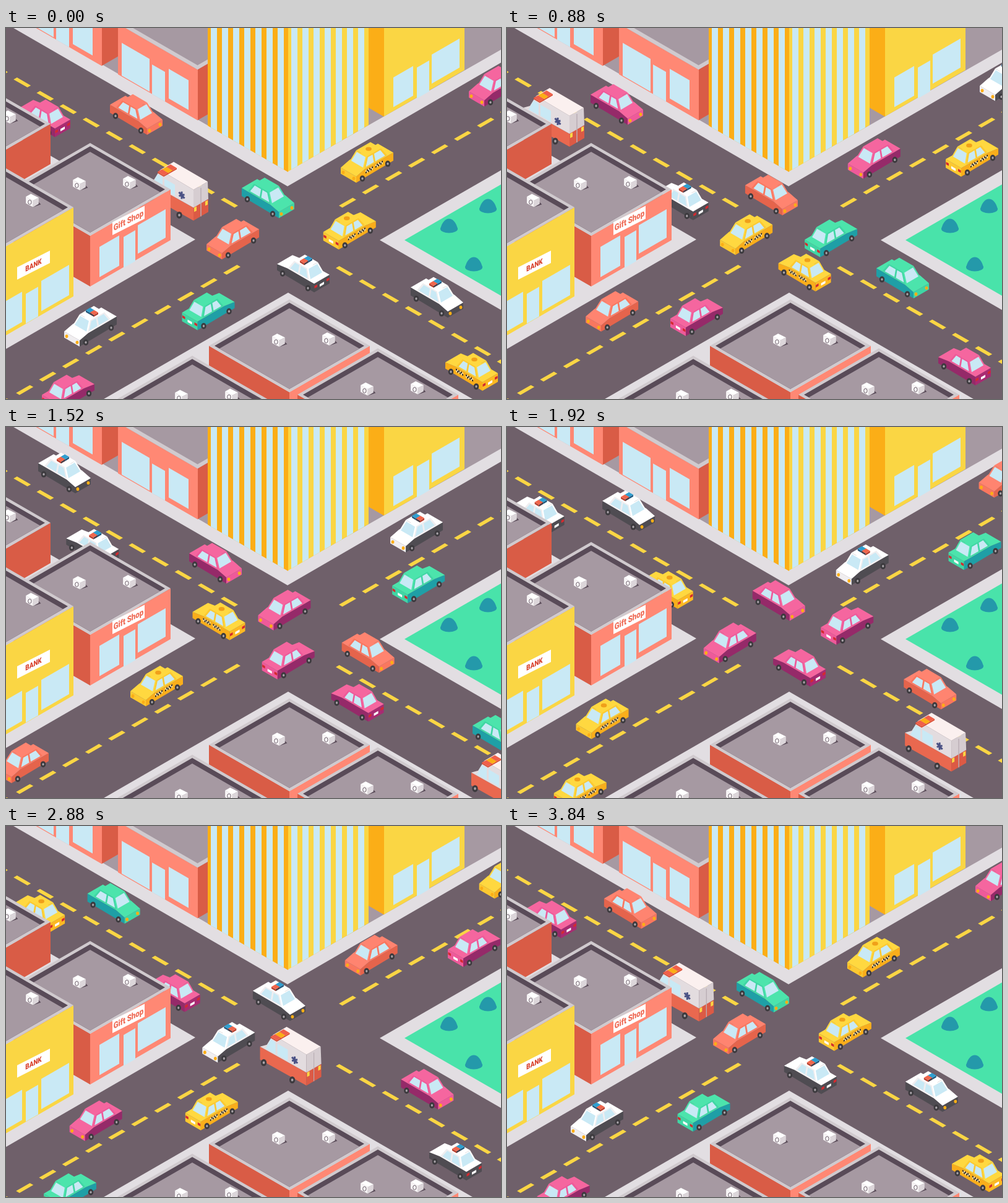
Animation, 800 px wide and 600 px high, one loop 3.88 s. Source, as an HTML page with a canvas:

```html
<!DOCTYPE html>
<html lang="en">
<head>
<meta charset="utf-8">
<title>City traffic</title>
<style>
  html, body { margin: 0; width: 100%; height: 100%; overflow: hidden; background: #6f606a; }
  canvas { display: block; }
</style>
</head>
<body>
<canvas id="stage" width="800" height="600"></canvas>
<script>
const ctx = document.getElementById('stage').getContext('2d');
const S = 0.577, STEP = 40, STEPS = 97;
const C = {
  road: '#6f606a', walk: '#e2dee2', roof: '#a699a2', rim: '#d0cace', shade: '#594b58',
  red: '#ff8874', brick: '#d95c46', yellow: '#fad644', orange: '#fbae17',
  glass: '#c9e9f5', green: '#49e3aa', bush: '#2499aa', white: '#ffffff', dark: '#3c3a3e'
};

function poly(color, ...pts) {
  ctx.fillStyle = color;
  ctx.beginPath();
  pts.forEach(p => ctx.lineTo(p[0], p[1]));
  ctx.fill();
}
function oval(color, x, y, rx, ry = rx) {
  ctx.fillStyle = color;
  ctx.beginPath();
  ctx.ellipse(x, y, rx, ry, 0, 0, 7);
  ctx.fill();
}
// Upright parallelogram: (x, y) is its top left, s the slope of its top edge
function wall(color, x, y, w, h, s) {
  poly(color, [x, y], [x + w, y + s * w], [x + w, y + s * w + h], [x, y + h]);
}
function diamond(color, x, y, w) {
  poly(color, [x - w, y], [x, y - w * S], [x + w, y], [x, y + w * S]);
}

// ---------- city ----------
// (x, y) is the middle of the first dash, (dx, dy) the way to the next
function dashes(x, y, dx, dy, count) {
  const s = Math.sign(dx * dy);
  for (let i = 0; i < count; i++, x += dx, y += dy) {
    poly(C.yellow, [x - 14, y - 4.8 * s], [x - 8.4, y - 8 * s],
      [x + 14, y + 4.8 * s], [x + 8.4, y + 8 * s]);
  }
}

function ground() {
  ctx.fillStyle = C.road;
  ctx.fillRect(0, 0, 800, 600);
  dashes(361, 282.5, -37.2, -21.6, 11);
  dashes(552, 282.5, 37.2, -21.6, 8);
  dashes(547, 393, 37.2, 21.6, 8);
  dashes(365, 391, -37.2, 21.6, 11);
}

function sidewalks() {
  poly(C.walk, [12, 0], [455, 256], [800, 56], [800, 0]);
  poly(C.roof, [53, 0], [455, 232], [800, 35], [800, 0]);
  poly(C.walk, [0, 165], [306, 342], [0, 519]);
  poly(C.walk, [800, 230], [604, 343], [800, 456]);
  poly(C.green, [800, 253], [644, 343], [800, 433]);
  poly(C.walk, [158, 600], [456, 428], [754, 600]);
  for (const [x, y] of [[716, 320], [779, 288], [756, 382]]) {
    oval(C.bush, x, y + 5, 14, 6.5);
    ctx.beginPath();
    ctx.moveTo(x - 14, y + 5);
    ctx.bezierCurveTo(x - 9, y - 17, x + 9, y - 17, x + 14, y + 5);
    ctx.fill();
  }
}

// (x, y) is the top of the near corner
function redShop(x, y) {
  wall(C.red, x - 129, y - 74, 129, 82, S);
  wall(C.rim, x - 129, y - 81, 129, 7, S);
  wall(C.brick, x, y, 26, 82, -S);
  wall(C.rim, x, y - 7, 26, 7, -S);
  wall(C.glass, x - 123, y - 43, 45, 53, S);
  wall(C.glass, x - 74, y - 8, 21, 48, S);
  wall(C.glass, x - 47, y - 1, 32, 48, S);
}

function northBlock() {
  redShop(155, -21);
  redShop(310, 67);

  wall(C.orange, 326, -100, 130, 258, S);
  wall(C.yellow, 456, -26, 130, 258, -S);
  for (let i = 0; i < 7; i++) {
    wall(C.glass, 331 + 18 * i, -100, 10, 261 + 18 * S * i, S);
    wall(C.glass, 461 + 18 * i, -20, 10, 249 - 18 * S * i, -S);
  }

  wall(C.orange, 586, -20, 25, 149, S);
  wall(C.yellow, 611, -10, 130, 153, -S);
  wall(C.glass, 626, 80, 32, 48, -S);
  wall(C.glass, 664, 64, 20, 50, -S);
  wall(C.glass, 688, 43, 45, 47, -S);
}

function airUnit(x, y) {
  ctx.save();
  ctx.translate(x, y);
  ctx.scale(0.9, 0.9);
  poly(C.shade, [-6, 7], [2, 12], [16, 7], [12, 3]);
  poly('#f8f5f6', [-11, -7], [2, 0], [2, 12], [-11, 5]);
  poly(C.white, [-11, -7], [-2, -12], [12, -5], [2, 0]);
  poly('#dcd6da', [2, 0], [12, -5], [12, 6], [2, 12]);
  ctx.strokeStyle = C.shade;
  ctx.lineWidth = 1;
  ctx.beginPath();
  ctx.ellipse(-4, 3, 3, 4, 0, 0, 7);
  ctx.stroke();
  ctx.restore();
}

function roof(x, y) {
  const w = 121, h = w * S, drop = 9, floor = w * (1 - drop / (2 * h));
  diamond(C.rim, x, y, 130);
  diamond(C.shade, x, y, w);
  poly(C.roof, [x, y - h + drop], [x + floor, y + drop / 2], [x, y + h], [x - floor, y + drop / 2]);
  airUnit(x - 18, y - 9);
  airUnit(x + 63, y - 11);
}

function sign(text, size, color, x, y, w, h) {
  wall(C.white, x, y, w, h, -0.51);
  ctx.save();
  ctx.transform(0.82, -0.42, 0, 1, x + w / 2, y - 0.255 * w + h / 2);
  ctx.fillStyle = color;
  ctx.font = `900 ${size}px Roboto, sans-serif`;
  ctx.textAlign = 'center';
  ctx.textBaseline = 'middle';
  ctx.fillText(text, 0, 0.5);
  ctx.restore();
}

function nearBlocks() {
  wall(C.brick, -58, 230, 130, 65, -S);
  roof(-58, 155);

  wall(C.brick, 6, 261, 130, 82, S);
  wall(C.red, 136, 336, 130, 82, -S);
  wall(C.glass, 151, 354, 32, 49, -S);
  wall(C.glass, 190, 338, 19, 50, -S);
  wall(C.glass, 213, 319, 45, 46, -S);
  roof(136, 261);
  sign('Gift Shop', 14, '#ee6a55', 172, 314, 52, 21);

  wall(C.yellow, -21, 365, 130, 144, -S);
  wall(C.glass, -20, 453, 46, 49, -S);
  wall(C.glass, 32, 430, 20, 48, -S);
  wall(C.glass, 57, 409, 45, 49, -S);
  roof(-21, 290);
  sign('BANK', 12, '#d9442f', 18, 387, 53, 20);

  wall(C.brick, 328, 514, 130, 82, S);
  wall(C.red, 458, 589, 130, 82, -S);
  roof(458, 514);
  wall(C.red, 301, 680, 130, 82, -S);
  roof(301, 605);
  wall(C.brick, 471, 593, 130, 82, S);
  wall(C.red, 601, 668, 130, 82, -S);
  roof(601, 593);
}

// ---------- vehicles ----------
// a runs along the car, b across it, h upwards
const iso = (a, b, h) => [a + b, 31.2 + 0.58 * (a - b) - h];
const face = (color, ...pts) => poly(color, ...pts.map(p => iso(...p)));
const sideQuad = (color, a0, a1, h0, h1) =>
  face(color, [a0, 0, h0], [a0, 0, h1], [a1, 0, h1], [a1, 0, h0]);
const endQuad = (color, b0, b1, h0, h1) =>
  face(color, [60, b0, h0], [60, b0, h1], [60, b1, h1], [60, b1, h0]);

function block(top, left, right, a0, a1, b0, b1, h0, h1) {
  face(left, [a0, b0, h0], [a0, b0, h1], [a1, b0, h1], [a1, b0, h0]);
  face(right, [a1, b0, h0], [a1, b0, h1], [a1, b1, h1], [a1, b1, h0]);
  face(top, [a0, b0, h1], [a0, b1, h1], [a1, b1, h1], [a1, b0, h1]);
}

// Paint: top, cabin, side, nose, tail
const PAINT = {
  red: ['#ff8470', '#f9775f', '#e5644c', '#f9775f', '#e5644c'],
  pink: ['#f5669f', '#ee5a9a', '#952a69', '#ee5a9a', '#a82b72'],
  green: ['#4ce4ac', '#40d6a4', '#1f9fa6', '#40d6a4', '#40d6a4'],
  police: [C.white, '#f0eef0', '#4f4c52', '#f0eef0', '#4f4c52'],
  taxi: ['#ffd840', '#fcc931', '#f9ae1b', '#fcc931', '#fcb923']
};

function car(kind, rear, mirrored) {
  const [top, cabin, side, nose, tail] = PAINT[kind];
  const [base0, roof0, roof1, base1] = rear ? [17, 24, 45, 51] : [9, 16, 39, 46];
  const h0 = rear ? 11 : 14, h1 = rear ? 14 : 10;
  const end = rear ? (mirrored ? nose : tail) : kind === 'police' && !mirrored ? side : nose;

  face(side, [0, 0, 1], [0, 0, h0], [base0, 0, 14], [base1, 0, 14], [60, 0, h1], [60, 0, 0]);
  endQuad(end, 0, 25, 0, h1);
  face(top, [0, 0, h0], [0, 25, h0], [base0, 25, 14], [base1, 25, 14],
    [60, 25, h1], [60, 0, h1], [base1, 0, 14], [base0, 0, 14]);

  if (rear) {
    endQuad('#d42a2f', 0.5, 5, 6, 10);
    endQuad('#d42a2f', 20, 24.5, 6, 10);
    endQuad(C.white, 9, 16, 4, 8);
  } else {
    for (const b of [4, 21]) oval(C.orange, ...iso(60, b, 4.5), 2.4, 2.8);
  }
  for (const a of [9, 50]) {
    const [x, y] = iso(a, 0, 1);
    oval(C.dark, x, y, 4.2, 5);
    oval('#a8a3a8', x, y, 1.6, 2);
  }
  if (kind === 'taxi') {
    for (const a of [17, 33]) {
      sideQuad('#fbe3a0', a, a + 12, 6, 11);
      for (let i = 0; i < 6; i++) {
        const h = i % 2 ? 6 : 8.5;
        sideQuad('#2b2527', a + 2 * i, a + 2 * i + 2, h, h + 2.5);
      }
    }
  }

  face(cabin, [base0, 1, 14], [roof0, 4, 28], [roof1, 4, 28], [base1, 1, 14]);
  face(top, [base1, 1, 14], [roof1, 4, 28], [roof1, 21, 28], [base1, 24, 14]);
  const mid = (roof0 + roof1) / 2 + (rear ? -1 : 1);
  face(C.glass, [base0 + 3, 1.5, 15], [roof0 + 1.5, 3.6, 26], [mid - 1, 3.6, 26], [mid - 1, 1.5, 15]);
  face(C.glass, [mid + 1.5, 1.5, 15], [mid + 1.5, 3.6, 26], [roof1 - 1.5, 3.6, 26], [base1 - 3, 1.5, 15]);
  face(C.glass, [base1, 3, 14.5], [roof1 + 0.6, 5.5, 26.5], [roof1 + 0.6, 19.5, 26.5], [base1, 22, 14.5]);
  face(top, [roof0, 4, 28], [roof0, 21, 28], [roof1, 21, 28], [roof1, 4, 28]);

  const c = (roof0 + roof1) / 2;
  if (kind === 'police') {
    block('#2f9fd0', '#20597f', '#20597f', c - 3.5, c + 3.5, 12.5, 19, 28, 31);
    block('#f0664c', '#b8402f', '#4a3a44', c - 3.5, c + 3.5, 6, 12.5, 28, 31);
  }
  if (kind === 'taxi') {
    const [x, y] = iso(c, 12.5, 28.5);
    oval('#f0a01a', x, y, 4.8, 3.2);
  }
}

function ambulance() {
  poly('#e9684f', [0, 32], [75, 74], [75, 95], [0, 53]);
  poly('#dc5a45', [75, 73], [99, 60], [99, 81], [75, 95]);
  poly('#e3dcdf', [0, 32], [11, 29], [21, 13], [75, 45], [75, 74]);
  poly('#d6cdd1', [75, 45], [98, 32], [99, 60], [75, 74]);
  poly('#fbf0ef', [43, 0], [98, 32], [75, 45], [21, 13]);
  poly(C.glass, [9, 35], [17, 20], [25, 25], [25, 44]);
  poly(C.glass, [28, 27], [45, 37], [45, 55], [28, 45]);
  ctx.strokeStyle = '#b9adb4';
  ctx.lineWidth = 1;
  ctx.strokeRect(87, 42, 0, 46);
  poly(C.yellow, [76, 74], [80, 72], [80, 79], [76, 81]);
  poly(C.yellow, [94, 64], [98, 62], [98, 69], [94, 71]);

  ctx.strokeStyle = '#4b5285';
  ctx.lineWidth = 3;
  ctx.beginPath();
  for (const [x, y] of [[0, 6], [4.5, -1], [4.5, 5]]) {
    ctx.moveTo(56 - x, 54 - y);
    ctx.lineTo(56 + x, 54 + y);
  }
  ctx.stroke();

  ['#f0604a', C.orange, '#f0604a'].forEach((color, i) => {
    const x = 38 - 7 * i, y = 4 + 4 * i;
    poly('#d8492f', [x - 7, y + 4], [x + 3, y + 10], [x + 10, y + 6], [x + 10, y + 8], [x + 3, y + 12], [x - 7, y + 6]);
    poly(color, [x, y], [x + 10, y + 6], [x + 3, y + 10], [x - 7, y + 4]);
  });
  for (const [x, y] of [[6, 58], [52, 86]]) {
    oval(C.dark, x, y, 4.6, 5.6);
    oval('#a8a3a8', x, y, 1.8, 2.2);
  }
}

// Each lane: road slope, seen from behind, mirrored, and its vehicles as
// [kind, height of the track, step, x, step, x, ...]
const LANES = [
  { slope: 0.6, rear: false, mirrored: false, cars: [
    ['red', -45, -16, 75, 0, 253, 57, 815],
    ['green', -38, 57, 67, 97, 466, 119, 682],
    ['police', -41, 38, 137, 97, 739],
    ['pink', -41.5, 0, -1.5, 81, 814]] },
  { slope: 0.592, rear: true, mirrored: false, cars: [
    ['pink', 54, 22, 782, 43, 557, 97, 104],
    ['ambulance', 23, 38, 851, 64, 568, 97, 327, 119, 125],
    ['police', 57, 72, 769, 97, 523, 154, 12],
    ['taxi', 55, -1, 804, 0, 795, 19.5, 545, 81, 18]] },
  { slope: -0.593, rear: false, mirrored: true, cars: [
    ['taxi', 505, 0, 541, 57, 31],
    ['red', 500.5, 57, 682, 135, -16],
    ['police', 505, 22, 764, 97, 94],
    ['pink', 504.5, 0, 748, 81, 22]] },
  { slope: -0.6, rear: true, mirrored: true, cars: [
    ['pink', 595.5, 0, 58, 50, 526, 81, 791],
    ['green', 598.5, 72, 61, 154, 794],
    ['taxi', 605, 57, 156, 119, 709]] }
];

// Piecewise linear, running on beyond both ends
function along(path, k) {
  let i = 0;
  while (i + 4 < path.length && k > path[i + 2]) i += 2;
  const [k0, x0, k1, x1] = path.slice(i, i + 4);
  return x0 + (x1 - x0) * (k - k0) / (k1 - k0);
}

function traffic(step) {
  const visible = [];
  for (const { slope, rear, mirrored, cars } of LANES) {
    for (const [kind, track, ...path] of cars) {
      for (const k of [step - STEPS, step, step + STEPS]) {
        const edge = along(path, k), van = kind === 'ambulance';
        const x = mirrored ? edge : edge - (van ? 99 : 85);
        const y = slope * edge + track - (rear && !van ? 5 : 0);
        if (x > -100 && x < 800) visible.push({ kind, rear, mirrored, x, y, van, foot: y + (van ? 95 : 66) });
      }
    }
  }
  visible.sort((p, q) => p.foot - q.foot);
  for (const v of visible) {
    ctx.save();
    ctx.translate(v.mirrored ? v.x + 85 : v.x, v.y);
    if (v.mirrored) ctx.scale(-1, 1);
    v.van ? ambulance() : car(v.kind, v.rear, v.mirrored);
    ctx.restore();
  }
}

function draw() {
  ground();
  sidewalks();
  northBlock();
  traffic(Math.floor(performance.now() / STEP) % STEPS);
  nearBlocks();
  requestAnimationFrame(draw);
}
draw();
</script>
</body>
</html>
```
